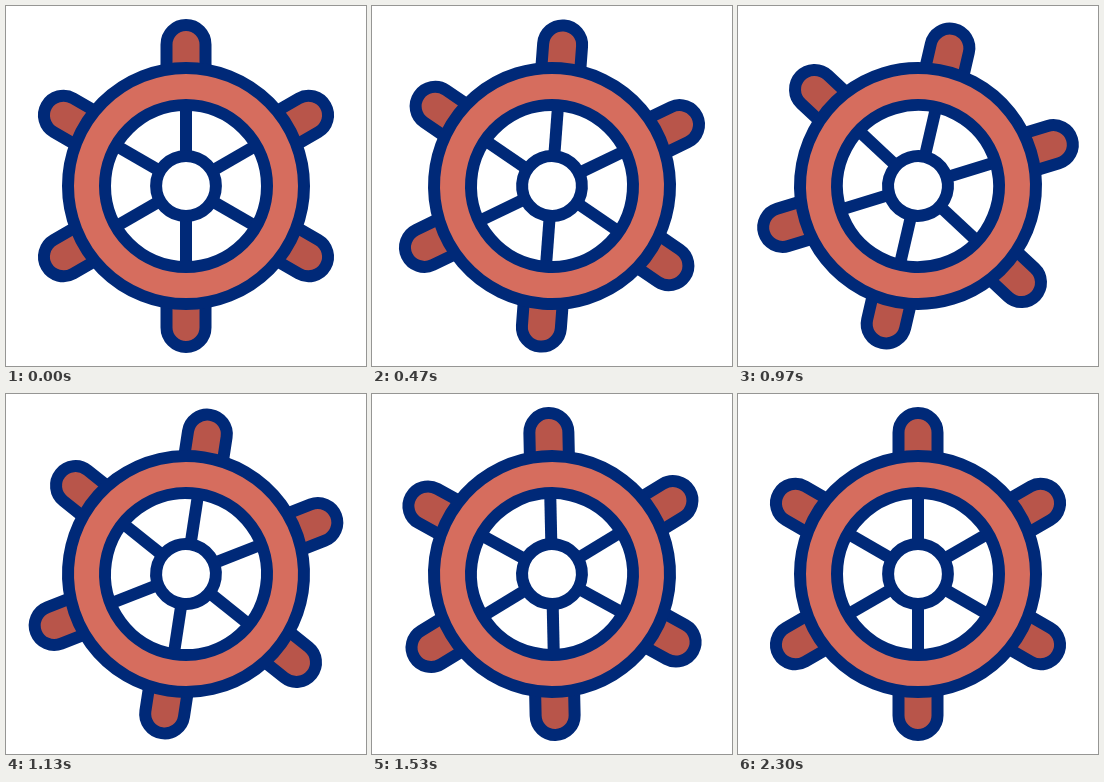
Recreate the animation shown at these times as an HTML page. Size 360 by 360 pixels, loop 2770 ms.

```html
<!DOCTYPE html>
<html lang="en">
<head>
<meta charset="utf-8">
<title>Ship wheel</title>
<style>
  html, body { margin: 0; width: 100%; height: 100%; overflow: hidden; background: #fff; }
  svg { display: block; width: 100vw; height: 100vh; }
</style>
</head>
<body>
<svg viewBox="-180 -180 360 360">
  <defs>
    <g id="arm">
      <path d="M-19.5-108V-141.5a19.5 19.5 0 0 1 39 0V-108" fill="#b8554a"/>
      <path d="M0-30V-81"/>
    </g>
  </defs>
  <g id="wheel" fill="none" stroke="#002978" stroke-width="12">
    <g id="arms"></g>
    <circle r="99.5" stroke="#d66d5e" stroke-width="37"/>
    <circle r="118"/>
    <circle r="81"/>
    <circle r="29.9"/>
  </g>
</svg>
<script>
  const LOOP = 2770, FPS = 30, LAST = 69;

  // [tick, angle, degrees per tick]: wind up, spin a full turn back, settle
  const keys = [
    [0, 0, 0], [7, 18, 0], [14, 4.3, -3.83], [29, -107, -11.67],
    [40, -247.3, -11], [58, -352.3, -1.94], [LAST, -360, 0]
  ];

  const wheel = document.getElementById('wheel');
  document.getElementById('arms').innerHTML = [0, 60, 120, 180, 240, 300]
    .map(a => `<use href="#arm" transform="rotate(${a})"/>`).join('');

  // Cubic Hermite curve through the keys
  function angleAt(tick) {
    const i = Math.max(1, keys.findIndex(k => k[0] >= tick));
    const [t0, a0, v0] = keys[i - 1], [t1, a1, v1] = keys[i];
    const d = t1 - t0, s = (tick - t0) / d, r = 1 - s;
    return a0 * r * r * (1 + 2 * s) + a1 * s * s * (3 - 2 * s)
      + d * s * r * (v0 * r - v1 * s);
  }

  // The wheel moves in 30 fps steps that start on whole hundredths of a second
  function tickAt(ms) {
    const t = Math.floor(ms % LOOP / 10) * 10;
    return Math.min(LAST, Math.floor((t + 3.4) * FPS / 1000));
  }

  function draw(now) {
    wheel.setAttribute('transform', `rotate(${angleAt(tickAt(now)).toFixed(3)})`);
    requestAnimationFrame(draw);
  }
  draw(performance.now());
</script>
</body>
</html>
```
